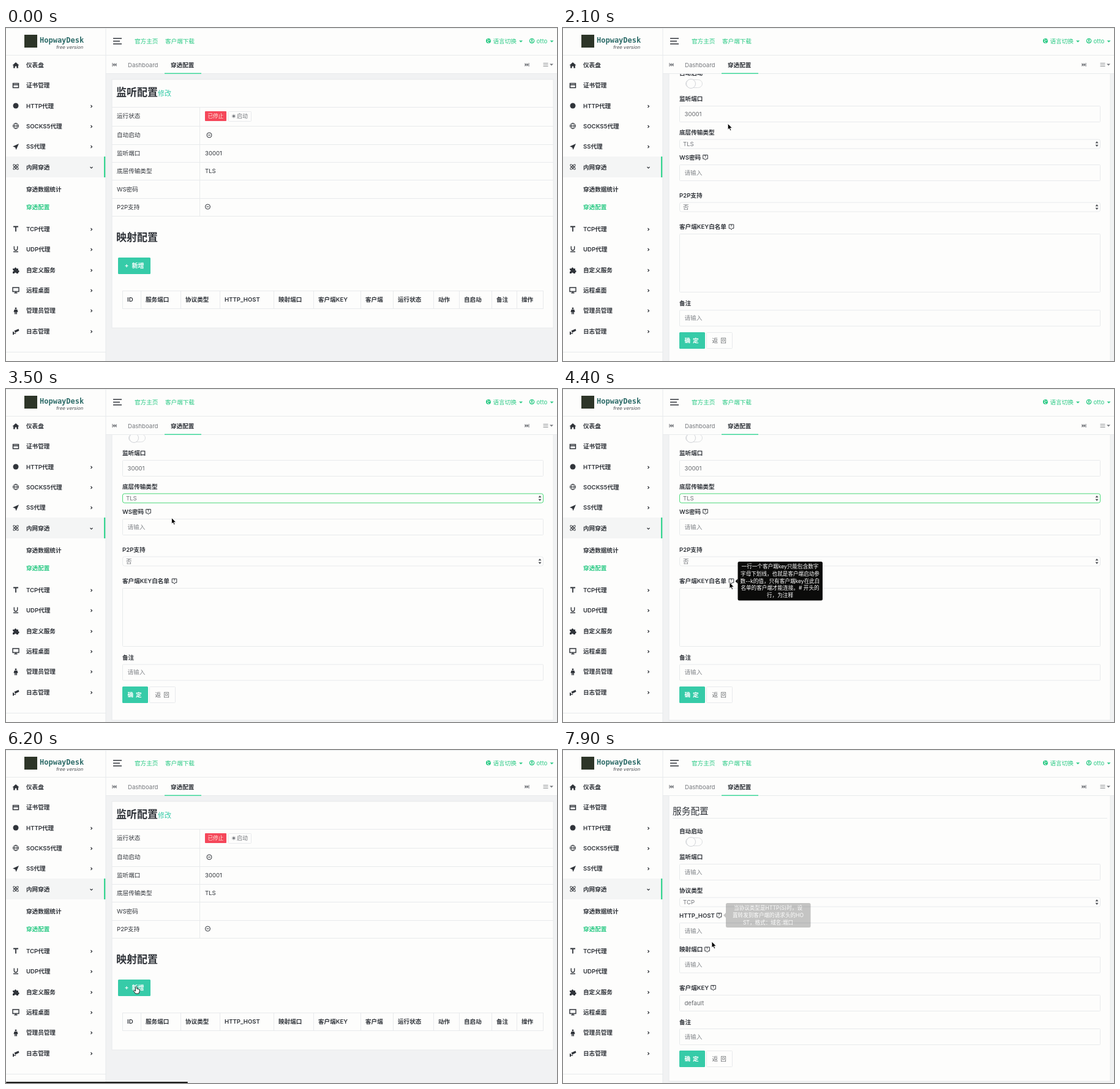
These frames come from a looping animation (900 by 544 pixels, 8 s). An HTML page:

```html
<!DOCTYPE html>
<html lang="zh-CN">
<head>
<meta charset="utf-8">
<style>
html, body { margin: 0; width: 100%; height: 100%; overflow: hidden; background: #fdfdfc; }
svg { display: block; width: 900px; height: 544px; font-family: Inter, "Noto Sans CJK SC", "Noto Sans CJK", sans-serif; }
text { white-space: pre; }
</style>
</head>
<body>
<svg id="stage" viewBox="0 0 900 544"></svg>
<script>
const PAPER = '#fdfdfc', GREY = '#f1f2f3', LINE = '#e8eaec', INK = '#30343a', SOFT = '#74777c', GREEN = '#2bca85', TEAL = '#36cba8';

// y is the vertical centre of the line
const text = (x, y, s, { size = 9.6, fill = INK, weight = 400, more = '' } = {}) =>
  `<text x="${x}" y="${y + size * .36}" font-size="${size}" fill="${fill}" font-weight="${weight}" ${more}>${s}</text>`;
const bold = (x, y, s, size = 9.6) => text(x, y, s, { size, weight: 600 });
const rect = (x, y, w, h, fill, more = '') => `<rect x="${x}" y="${y}" width="${w}" height="${h}" fill="${fill}" ${more}/>`;
const box = (x, y, w, h, r = 1, color = LINE, fill = PAPER) =>
  rect(x + .5, y + .5, w - 1, h - 1, fill, `rx="${r}" stroke="${color}"`);
const path = (x, y, d, fill = INK, stroke = 'none', width = 1.2) =>
  `<path transform="translate(${x} ${y})" d="${d}" fill="${fill}" stroke="${stroke}" stroke-width="${width}"/>`;
const outline = (x, y, d, color = INK, width = 1.2) => path(x, y, d, 'none', color, width);
const group = (id, body) => `<g id="${id}">${body}</g>`;
const circle = r => `M${-r} 0a${r} ${r} 0 1 0 ${2 * r} 0a${r} ${r} 0 1 0 ${-2 * r} 0z`;
const caret = (x, y, color) => path(x, y, 'M-3-1.5h6l-3 3z', color);

const globe = circle(4.5) + 'M-4.5 0h9M0-4.5c-3 3-3 6 0 9M0-4.5c3 3 3 6 0 9';
// centre, name, arrow (1 closed, 2 open), icon
const menu = [
  [61, '仪表盘', 0, path(16, 61, 'M0-5L-5.5 0h1.6v4.5h2.6v-3h2.6v3h2.6V0h1.6z')],
  [94, '证书管理', 0, outline(16, 94, 'M-4.5-3.5h9v7h-9zM-4.5-1.2h9', INK, 1.5)],
  [128, 'HTTP代理', 1, path(16, 127, circle(4.5))],
  [161, 'SOCKS5代理', 1, outline(16, 160, globe, INK, 1)],
  [194, 'SS代理', 1, path(16, 194, 'M5-5L-5-.5l4 1.6L.6 5z')],
  [228, '内网穿透', 2, outline(16, 227, circle(1.5) + 'M-4-4c3-1 9 5 8 8c-3 1-9-5-8-8zM4-4c-3-1-9 5-8 8c3 1 9-5 8-8z', INK, 1)],
  [329, 'TCP代理', 1, outline(16, 328, 'M-4-3.5h8M0-3.5v8', INK, 1.8)],
  [362, 'UDP代理', 1, outline(16, 361, 'M-2.7-4.5v4a2.7 2.7 0 0 0 5.4 0v-4M-4 4.5h8', INK, 1.4)],
  [396, '自定义服务', 1, path(16, 396, 'M-5-3h2.8a1.7 1.7 0 1 1 3.4 0H4v2.8a1.7 1.7 0 1 1 0 3.4V5H1a1.6 1.6 0 0 0-3.2 0H-5V2a1.5 1.5 0 0 0 0-3z')],
  [429, '远程桌面', 1, outline(16, 428, 'M-5-4h10v6.5h-10zM-2.5 4.8h5M0 2.5v2', INK, 1.4)],
  [462, '管理员管理', 1, path(16, 462, 'M-1.5-4a1.5 1.5 0 1 1 3 0a1.5 1.5 0 1 1-3 0M-2.5-2h5L3.5 2H2v3.5H.4V2h-.8v3.5H-2V2h-1.5z')],
  [496, '日志管理', 1, path(16, 496, 'M-2.5-1.5L4.5-4.5 5.5-1.5-1 1.8zM-5 0h1.4l1 2.2H0l.5 1.3h-3.6V5H-5z')]
];

const chrome = () => {
  let s = rect(0, 0, 163, 544, PAPER) + rect(163, 0, 737, 75, PAPER)
    + rect(0, 210, 163, 34, '#f4f5f5') + rect(160, 210, 2.5, 34, '#35d490')
    + rect(0, 0, 900, 1, LINE) + rect(0, 44, 900, 1, LINE) + rect(163, 74, 737, 1, LINE)
    + rect(162.5, 0, 1, 544, LINE) + rect(0, 529, 163, 1, LINE)
    + rect(30, 11, 21, 21, '#2d3528')
    + text(55, 19.5, 'HopwayDesk', { size: 12, weight: 700, fill: '#2f6d6a', more: 'font-family="DejaVu Sans Mono, monospace"' })
    + text(82, 31, 'free version', { size: 7.4, fill: '#44484c', more: 'font-family="DejaVu Sans, sans-serif" font-style="italic"' });
  for (const [y, name, arrow, icon] of menu) {
    s += icon + bold(33, y, name);
    if (arrow) s += outline(139.5, y, arrow > 1 ? 'M-2-1l2 2 2-2' : 'M-1-2l2 2-2 2');
  }
  s += bold(33, 264, '穿透数据统计') + text(33, 293, '穿透配置', { fill: GREEN, weight: 600 })
    + outline(175, 21.5, 'M0-4.5h14M0 0h11M0 4.5h14', INK, 1.5)
    + text(210, 22, '官方主页', { fill: GREEN }) + text(260, 22, '客户端下载', { fill: GREEN })
    + path(788, 21, circle(4), GREEN) + outline(788, 21, 'M-2-3l2 2-2 2 3 2M3-2l-2 2', PAPER, 1)
    + text(795.5, 21.5, '语言切换', { fill: GREEN }) + caret(841, 22, GREEN)
    + outline(859, 21, circle(3.7) + 'M-2.5 2.5q2.5-2 5 0', GREEN) + path(859, 20, circle(1.4), GREEN)
    + text(866.5, 21.5, 'otto', { fill: GREEN }) + caret(891.5, 22, GREEN)
    + path(177, 60, 'M-3.5-3h1v6h-1zM.5-3v6l-3-3zM3.5-3v6l-3-3z', SOFT)
    + text(199, 60.5, 'Dashboard', { fill: SOFT }) + bold(269, 60.5, '穿透配置')
    + rect(259, 73.5, 60, 1.5, '#3fd79a')
    + path(851, 60, 'M2.5-3h1v6h-1zM-3.5-3v6l3-3zM-.5-3v6l3-3z', SOFT)
    + outline(881.5, 60, 'M-4-2.5h8M-4 0h8M-4 2.5h8', '#96999c', 1) + caret(891, 60, SOFT);
  return s;
};

const listView = () => {
  let s = rect(173, 84, 721, 406, PAPER, `stroke="${LINE}"`)
    + bold(180, 105, '监听配置', 17) + text(248, 107, '修改', { size: 11, fill: TEAL });
  [129, 160, 190, 219, 248, 278, 307].forEach(y => s += rect(173, y, 721, 1, LINE));
  s += rect(316, 129, 1, 178, LINE);
  ['运行状态', '自动启动', '监听端口', '底层传输类型', 'WS密码', 'P2P支持'].forEach((name, i) =>
    s += text(181, [144, 175, 205, 234, 263.5, 292.5][i], name));
  s += rect(325, 136, 35, 16, '#f5475a', 'rx="1"') + text(329.5, 144, '已停止', { size: 8.6, fill: '#ffe6dc' })
    + box(363, 136, 38, 17) + path(372, 144, circle(1.8), SOFT)
    + outline(372, 144, 'M-3.5 0h7M0-3.5v7M-2.5-2.5l5 5M2.5-2.5l-5 5', SOFT, .6)
    + text(377, 144, '启动', { size: 9, fill: SOFT });
  for (const [x, y] of [[332, 175], [329.5, 292]]) s += outline(x, y, circle(4) + 'M-2 0h4', INK, 1);
  s += text(325, 205, '30001') + text(325, 234, 'TLS')
    + bold(180, 342, '映射配置', 17)
    + rect(183, 375, 53, 27, TEAL, 'rx="1.5"') + outline(197, 388.5, 'M-2.5 0h5M0-2.5v5', '#fff')
    + text(205.5, 388.5, '新增', { size: 10, fill: '#fff', weight: 600 })
    + box(190, 429, 688, 30, 0);
  const cols = [198, 'ID', 228, '服务端口', 293, '协议类型', 357, 'HTTP_HOST', 445, '映射端口', 510, '客户端KEY',
    587, '客户端', 640, '运行状态', 706, '动作', 748, '自启动', 801, '备注', 842, '操作'];
  for (let i = 0; i < cols.length; i += 2)
    s += rect(cols[i] - 8, 429, 1, 30, LINE) + bold(cols[i], 444, cols[i + 1]);
  return s;
};

const help = (x, y) => outline(x, y, 'M-3.8-4h7.6v6.3H1.5L0 4.3-1.5 2.3h-2.3z', INK, 1) + bold(x - 1.7, y - .8, '?', 5.5);
const label = (y, s, helpX) => bold(190, y, s) + (helpX ? help(helpX, y) : '');
const input = (y, s = '请输入') => box(190, y, 688, 27) + text(198.5, y + 13.5, s, { fill: s == '请输入' ? '#85888c' : '#64676b' });
const select = (y, s, id) => box(190, y, 688, 16, 3) + (id ? group(id, box(190, y, 688, 16, 3, '#4fdc7c')) : '')
  + text(196, y + 8, s, { fill: SOFT }) + path(872, y + 8, 'M-2.5-1.2L0-4.5 2.5-1.2zM-2.5 1.2L0 4.5 2.5 1.2z', '#505358');
const formView = (bottom, buttons, body) => rect(173, 84, 721, bottom - 84, PAPER, `stroke="${LINE}"`)
  + text(179, 113, '服务配置', { size: 14.7, weight: 500 }) + rect(179, 124, 710, 1, LINE)
  + label(146, '自动启动') + box(200, 156, 28, 14, 7, '#dcdee0') + path(209, 163, circle(7.5), PAPER, '#d2d4d8', 1)
  + label(188, '监听端口') + body
  + rect(190, buttons, 42, 27, TEAL, 'rx="1.5"') + text(198.5, buttons + 13.5, '确 定', { fill: '#fff', weight: 600, more: 'word-spacing="1.5"' })
  + box(234, buttons, 43, 27) + text(243.5, buttons + 13.5, '返 回', { fill: '#64676b', more: 'word-spacing="1.5"' });

const serviceForm = () => formView(624, 569, input(199, '30001')
  + label(243, '底层传输类型') + select(253.5, 'TLS', 'focus')
  + label(283.5, 'WS密码', 232.5) + input(295)
  + label(346, 'P2P支持') + select(356.5, '否')
  + label(397, '客户端KEY白名单', 275) + box(190, 408, 688, 96)
  + label(522, '备注') + input(532.5));

const mappingForm = () => formView(554, 504, input(199)
  + label(243, '协议类型') + select(253.5, 'TCP')
  + label(283.5, 'HTTP_HOST', 255) + input(295)
  + label(339, '映射端口', 235.5) + input(350.5)
  + label(401.5, '客户端KEY', 245.5) + input(413, 'default')
  + label(457.5, '备注') + input(468));

const options = () => rect(183, 155, 688, 46, '#ececE6', 'rx="3" style="filter:drop-shadow(0 4px 6px #0005)"')
  + rect(183, 171.5, 688, 13.5, '#3f8fcb')
  + text(197, 164.5, 'TCP') + text(197, 178, 'TLS', { fill: '#fff' }) + text(197, 191, 'WS')
  + outline(189, 178, 'M-3 0l2 2.5 4-5', '#fff', 1.4);

const tooltip = (x, y, h, tipY, lines) => rect(x, y, 138.5, h, '#0b0b0a', 'rx="2.5"') + path(x, tipY, 'M0-4l-4 4 4 4z', '#0b0b0a')
  + lines.map((s, i) => text(x + 69, y + 7.7 + i * 11.9, s, { size: 8.6, fill: '#fff', more: 'text-anchor="middle"' })).join('');

const $ = id => document.getElementById(id);
$('stage').innerHTML = `<clipPath id="page"><rect x="163" y="75" width="737" height="469"/></clipPath>`
  + rect(163, 75, 737, 469, GREY)
  + `<g clip-path="url(#page)">${group('list', listView())}${group('service', serviceForm())}${group('mapping', mappingForm())}</g>`
  + chrome()
  + group('options', options())
  + group('keyTip', tooltip(285.5, 282, 63.5, 314, ['一行一个客户端key只能包含数字', '字母下划线，也就是客户端启动参',
    '数--k的值，只有客户端key在此白', '名单的客户端才能连接。# 开头的', '行，为注释']))
  + group('hostTip', tooltip(266, 250, 40, 270, ['当协议类型是HTTP(S)时，设', '置转发到客户端的请求头的HO', 'ST，格式：域名:端口']))
  + group('status', rect(0, 542, 297, 2, '#1c1c1a', 'rx="1"'))
  + group('arrow', path(0, 0, 'M0 0v10l2.3-2.1 1.6 3.6 1.7-.7-1.6-3.5h3.2z', '#000', '#fff', .8))
  + group('hand', path(0, 0, 'M-1.2 1q1.2-2 2.2 0v3l4.5 1.2v3L4 12h-5L-4.5 7.5q.5-1.6 2-.5l1.3 1z', '#fff', '#222', 1));

const cursorKeys = [[400, 345, 240], [1000, 259, 105], [1300, 261, 106], [1400, 265, 109], [1700, 268, 130], [2400, 270, 173],
  [3300, 270, 173], [3900, 272, 316], [4600, 272, 316], [5100, 258, 493], [5500, 259, 493], [6000, 212, 386],
  [6500, 214, 386], [6700, 225, 379], [7250, 255, 268], [7650, 255, 268], [7900, 243, 313], [8000, 240, 320]];
const between = (t, a, b) => t >= a && t < b;
const ease = (t, a, b) => { const u = Math.min(1, Math.max(0, (t - a) / (b - a))); return u * u * (3 - 2 * u); };
const track = t => {
  const i = Math.max(1, cursorKeys.findIndex(k => k[0] > t));
  const [a, x, y] = cursorKeys[i - 1], [b, x2, y2] = cursorKeys[i], u = ease(t, a, b);
  return `translate(${x + (x2 - x) * u} ${y + (y2 - y) * u})`;
};
const show = (id, on) => $(id).style.display = on ? '' : 'none';
const scroll = (id, y) => $(id).setAttribute('transform', `translate(0 ${-Math.round(y)})`);

function draw(now) {
  const t = now % 8000;
  show('list', t < 1300 || between(t, 5400, 6500));
  show('service', between(t, 1300, 5400));
  show('mapping', t >= 6500);
  show('focus', t >= 2500);
  show('options', between(t, 2600, 3300));
  show('keyTip', between(t, 3900, 4700));
  show('hostTip', t >= 7250);
  show('status', between(t, 1000, 1500) || between(t, 5950, 6600));
  $('hostTip').style.opacity = Math.min(1, (t - 7250) / 150, Math.max(0, (7940 - t) / 170));
  scroll('service', 83 * ease(t, 1600, 2250));
  scroll('mapping', 13 * ease(t, 6850, 7100));
  const hand = between(t, 950, 1300) || between(t, 5000, 5600) || between(t, 5900, 6500);
  show('hand', hand);
  show('arrow', t >= 400 && !hand);
  $(hand ? 'hand' : 'arrow').setAttribute('transform', track(t));
}
const start = performance.now();
(function loop() {
  draw(performance.now() - start);
  requestAnimationFrame(loop);
})();
</script>
</body>
</html>
```
